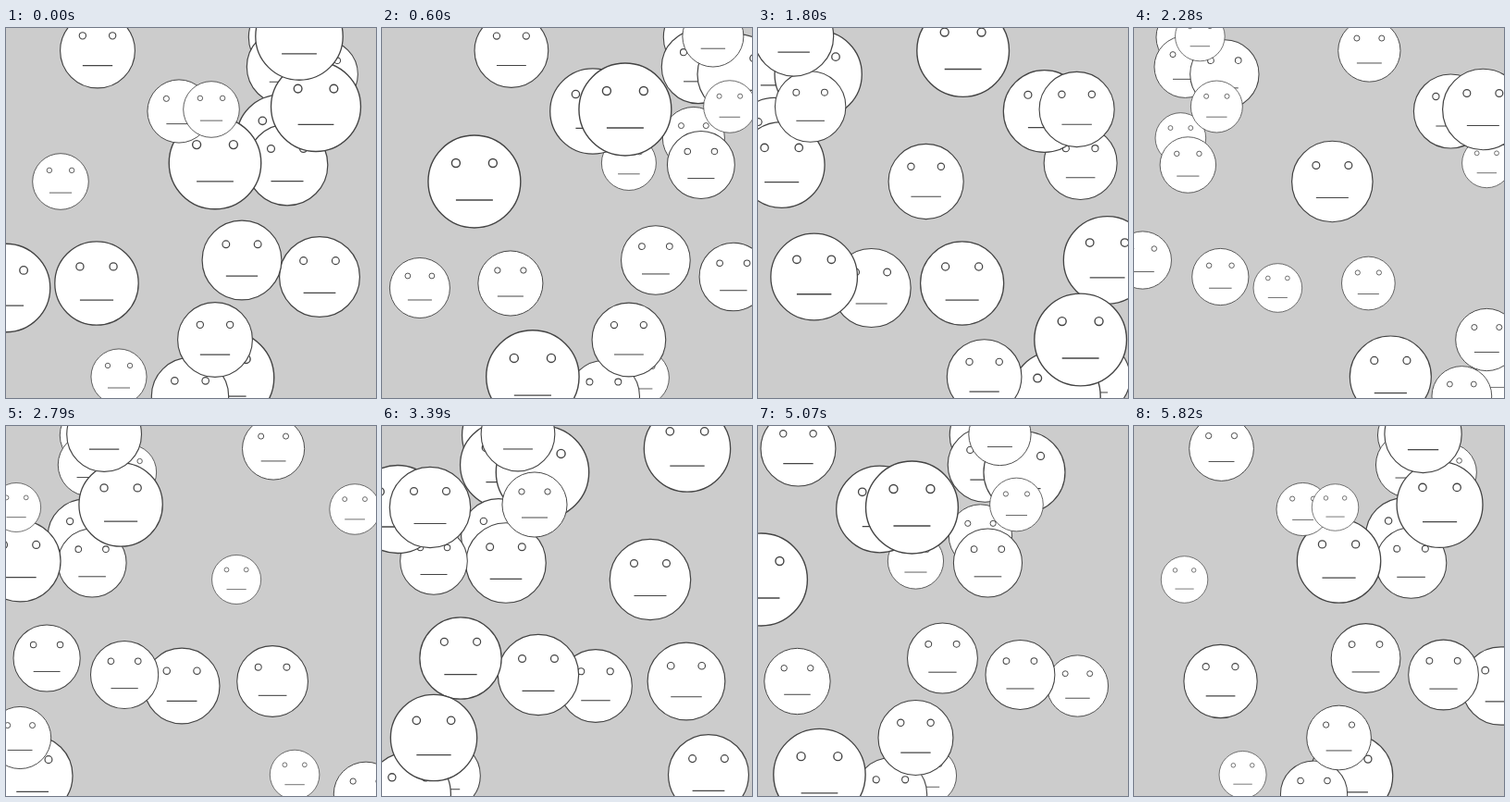
Write an HTML page without scripts that moves like this. It is 400x400 px and loops after 5850 ms.

```html
<!DOCTYPE html>
<html lang="en">
<head>
<meta charset="utf-8">
<title>Drifting faces</title>
<style>
  @property --t { syntax: "<number>"; inherits: true; initial-value: 0; }
  @property --n { syntax: "<integer>"; inherits: false; initial-value: 0; }

  html, body { margin: 0; width: 100%; height: 100%; overflow: hidden; background: #ccc; }

  svg {
    display: block;
    width: 100%;
    height: 100%;
    animation: run 5850ms steps(195, end) infinite;
  }
  @keyframes run { from { --t: 0; } to { --t: 1; } }

  /* --x, --y: start position; --p: start phase of the size */
  use {
    /* drift right, jump back to the left edge after 400 */
    --go: calc(var(--x) + 398.6 * var(--t));
    --wrap: clamp(0, (var(--go) - 400) * 10000, 1);
    --px: calc(var(--go) - 401 * var(--wrap));
    /* triangle wave: distance from the nearest even number */
    --u: calc(var(--p) + 7.82 * var(--t));
    --n: calc(var(--u) / 2);
    --d: calc(var(--u) - 2 * var(--n));
    --size: calc(0.5 + 0.505 * max(var(--d), -1 * var(--d)));
    transform: translate(calc(var(--px) * 1px), calc(var(--y) * 1px)) scale(var(--size));
  }
</style>
</head>
<body>
<svg viewBox="0 0 400 400">
  <defs>
    <g id="face" fill="#fff" stroke="#444" stroke-width="1.4">
      <circle r="50"/>
      <circle cx="-20" cy="-20" r="4.5"/>
      <circle cx="20" cy="-20" r="4.5"/>
      <path d="M-20 20H20"/>
    </g>
  </defs>
  <use href="#face" style="--x:99; --y:24.5; --p:.61"/>
  <use href="#face" style="--x:0; --y:281; --p:.9"/>
  <use href="#face" style="--x:98; --y:276; --p:.8"/>
  <use href="#face" style="--x:59; --y:166; --p:.21"/>
  <use href="#face" style="--x:303; --y:10; --p:.62"/>
  <use href="#face" style="--x:301; --y:42; --p:.62"/>
  <use href="#face" style="--x:343.5; --y:50; --p:.47"/>
  <use href="#face" style="--x:296; --y:119; --p:.86"/>
  <use href="#face" style="--x:304; --y:148; --p:.745"/>
  <use href="#face" style="--x:226; --y:146; --p:1.02"/>
  <use href="#face" style="--x:187; --y:90; --p:.36"/>
  <use href="#face" style="--x:222; --y:88; --p:.21"/>
  <use href="#face" style="--x:335; --y:85; --p:1.07"/>
  <use href="#face" style="--x:317; --y:9; --p:.88"/>
  <use href="#face" style="--x:339; --y:269; --p:.73"/>
  <use href="#face" style="--x:255; --y:251; --p:.71"/>
  <use href="#face" style="--x:239.5; --y:378; --p:1"/>
  <use href="#face" style="--x:199; --y:398; --p:.66"/>
  <use href="#face" style="--x:226; --y:337; --p:.61"/>
  <use href="#face" style="--x:122; --y:377; --p:.2"/>
</svg>
</body>
</html>
```
